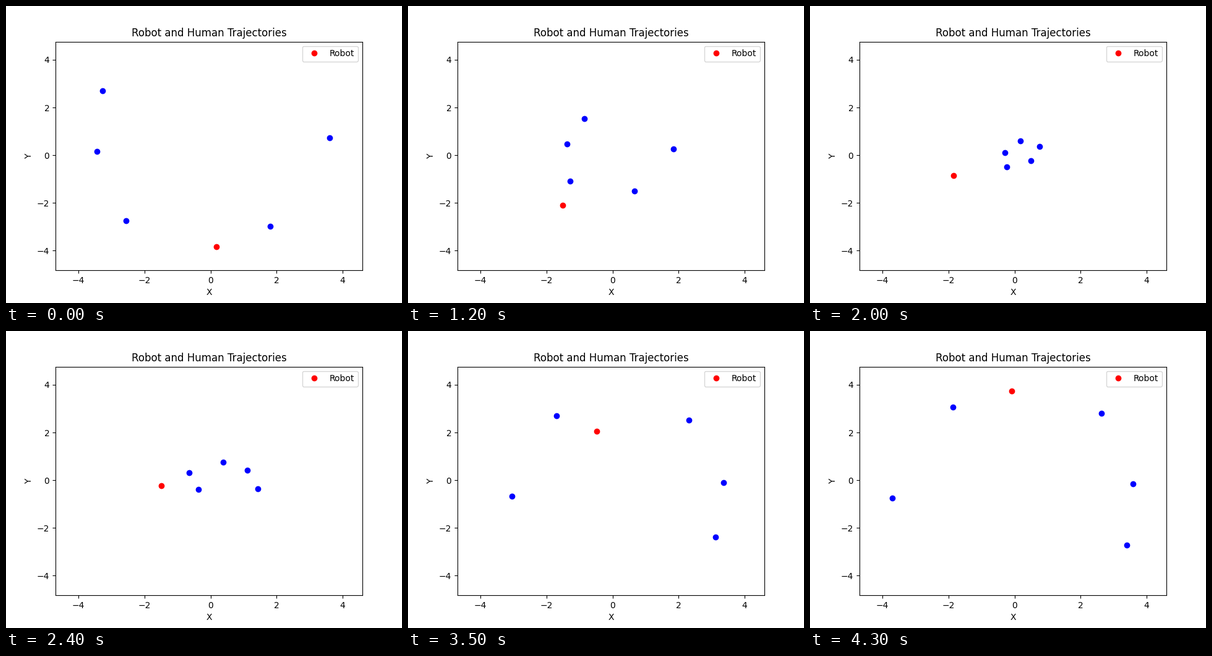
Write a matplotlib script that moves like this. It is 640x480 px and loops after 4400 ms.

```python
import numpy as np
import matplotlib.pyplot as plt
from matplotlib.animation import FuncAnimation

FRAMES, STEP_MS = 44, 100
DT = 0.25                              # time per step; top speed is 1
ORIGIN = np.array([330.5, 241.15])     # stage pixel of (0, 0)
SCALE = np.array([53.33, -38.55])      # pixels per data unit

# Key points in stage pixels; the last of each list is the goal
HUMAN_T = (0, 12, 20, 29)
HUMANS = [
    [(156, 137), (285, 182), (371, 227), (449, 293), (514, 347)],
    [(147, 235), (257, 223), (340, 218), (456, 237), (523.5, 247)],
    [(194, 347), (262, 283), (315, 237), (399, 180), (473, 131.5)],
    [(427, 356), (366, 299), (318, 260), (269, 185), (230, 121.5)],
    [(523, 213), (429, 231), (357, 250), (248, 262), (129, 270)],
]
ROBOT_T = (0, 6, 12, 17, 20, 29, 35)
ROBOT = [(340, 389), (281, 363), (250, 322), (209, 286), (232, 274),
         (270, 213), (305, 162), (330, 84)]


def spline(times, pts):
    """Smooth curve through pts, sampled at every step; it sets off gently."""
    times = np.array(times, float)
    t = np.arange(times[-1] + 1)
    slope = np.gradient(pts, times, axis=0)
    slope[0] *= 0.85
    i = np.clip(np.searchsorted(times, t, side="right") - 1, 0, len(times) - 2)
    h = (times[i + 1] - times[i])[:, None]
    u = (t - times[i])[:, None] / h
    return ((1 + 2 * u) * (1 - u) ** 2 * pts[i] + u * (1 - u) ** 2 * h * slope[i]
            + u * u * (3 - 2 * u) * pts[i + 1] + u * u * (u - 1) * h * slope[i + 1])


def walk(times, points):
    """Pass the key points, then head for the goal and slow down near it."""
    pts = (np.array(points) - ORIGIN) / SCALE
    path, goal = list(spline(times, pts[:-1])), pts[-1]
    while len(path) < FRAMES:
        way = goal - path[-1]
        path.append(path[-1] + DT * way / max(1, np.hypot(*way)))
    return np.array(path)


robot = walk(ROBOT_T, ROBOT)
humans = np.array([walk(HUMAN_T, h) for h in HUMANS])

fig, ax = plt.subplots(figsize=(6.4, 4.8), dpi=100)
ax.set(xlim=(np.array([80, 576]) - ORIGIN[0]) / SCALE[0],
       ylim=(np.array([427.2, 57.6]) - ORIGIN[1]) / SCALE[1],
       xticks=range(-4, 5, 2), yticks=range(-4, 5, 2),
       xlabel="X", ylabel="Y", title="Robot and Human Trajectories")
robot_dot, = ax.plot([], [], "ro", label="Robot")
human_dots, = ax.plot([], [], "bo")
ax.legend(loc="upper right")


def update(n):
    robot_dot.set_data(*robot[n:n + 1].T)
    human_dots.set_data(*humans[:, n].T)
    return robot_dot, human_dots


anim = FuncAnimation(fig, update, frames=FRAMES, interval=STEP_MS,
                     repeat=True, repeat_delay=0)
plt.show()
```
